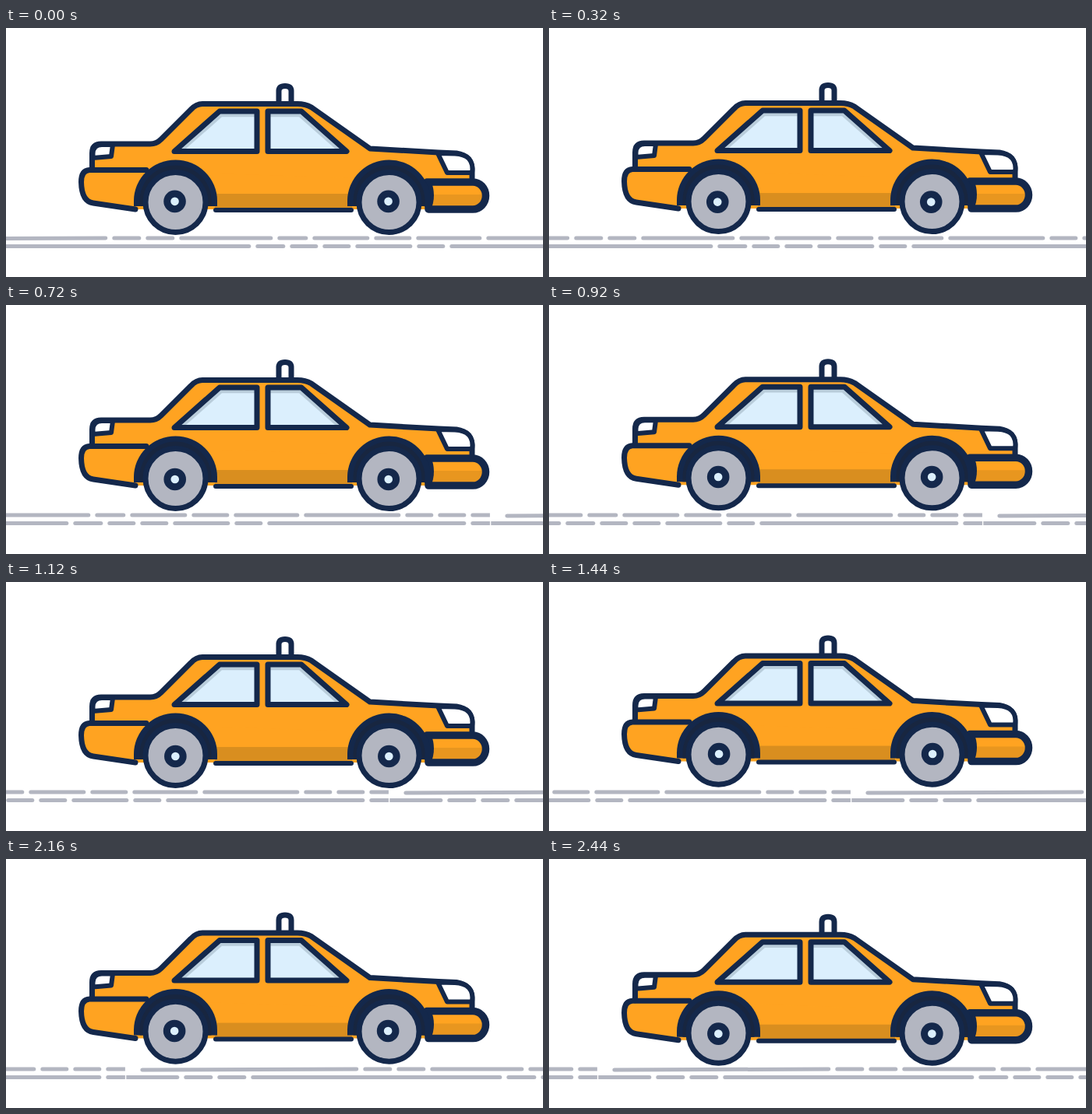
Recreate the animation shown at these times as an HTML page. Size 689x320 px, loop 2480 ms.

```html
<!DOCTYPE html>
<html lang="en">
<head>
<meta charset="utf-8">
<title>Taxi on the road</title>
<style>
html, body { margin: 0; width: 100%; height: 100%; overflow: hidden; background: #fff; }
svg { display: block; width: 689px; height: 320px; }
.line { fill: none; stroke: #14284b; stroke-width: 7; stroke-linecap: round; stroke-linejoin: round; }
.thin { stroke-width: 6; }
.thick { stroke-width: 9.5; }
.navy { fill: #14284b; }
.body { fill: #ffa321; }
.white { fill: #fff; }
.glass { fill: #dbeffd; }
.grey { fill: #b3b6c1; }
.road { stroke: #b3b6c1; stroke-width: 5; stroke-linecap: round; }
</style>
</head>
<body>
<svg viewBox="0 0 689 320">
  <defs>
    <clipPath id="tileClip"><rect y="260" width="1022.6" height="30"/></clipPath>
    <g id="tile" class="road" clip-path="url(#tileClip)"></g>
    <g id="arch">
      <path class="navy" d="M-53.5 229V222A53.5 52.5 0 0 1 53.5 222V229Z"/>
      <path fill="#182640" d="M-46 229V222A46 45.5 0 0 1 46 222V229Z"/>
    </g>
    <path id="shell" d="M110.5 182V161Q110.5 149 122 149H185Q193 149 199 143L237 105Q244 97.5 252 97.5H374Q384 97.5 392 102L467 155L555 160L578 161Q598 164 598 183V198"/>
    <path id="panes" d="M216 158.5L274 107H322V158.5ZM336 107H379L437 158.5H336Z"/>
  </defs>

  <g id="road"><use href="#tile"/><use href="#tile" x="1024"/></g>

  <g id="car">
    <path class="line white" d="M350 97V81Q350 74.5 358 74.5T366 81V97"/>
    <path class="body" d="M106 182H598V233H166L111 225Q97 223 97 197Q97 183 106 182Z"/>
    <use href="#shell" class="body"/>
    <rect x="268" y="213" width="176" height="19" fill="#d98e1f"/>
    <use href="#shell" class="line"/>
    <path class="line" d="M180 182.5H107Q96.5 183 96.5 198Q97 223 112 225L166 233"/>
    <path class="line thin white" d="M111.5 167L135 165L137 150H123Q112 150 111.5 161Z"/>
    <path class="line thin white" d="M554 161L566 186H598Q600 175 594 168Q588 162 576 161.5Z"/>

    <path class="body" d="M540 198H599A16.5 17.5 0 0 1 599 233H541Z"/>
    <path fill="#e8961f" d="M544 214H615.5Q615 233 599 233H541Z"/>
    <path class="navy" d="M530 196H545Q553 215 545 234H538Z"/>
    <path class="line thick" d="M540 198H599A16.5 17.5 0 0 1 599 233H542"/>

    <use href="#panes" fill="#b9cddb"/>
    <path class="glass" d="M227 158.5L277 114.3H322V158.5ZM336 114.3H376L426 158.5H336Z"/>
    <use href="#panes" class="line"/>

    <use href="#arch" x="217.5"/>
    <use href="#arch" x="491.5"/>
    <path class="line thin" d="M269 234H443"/>
  </g>

  <g id="wheels"></g>
</svg>
<script>
const LOOP = 2480, STEP = 40, TURN = 2 * Math.PI;
const get = id => document.getElementById(id);

function add(parent, tag, attrs) {
  const el = document.createElementNS('http://www.w3.org/2000/svg', tag);
  for (const k in attrs) el.setAttribute(k, attrs[k]);
  parent.append(el);
  return el;
}

// Lays dashes end to end; each pitch is a dash plus the gap after it
function dashes(x, y, tilt, pitches) {
  for (const pitch of pitches) {
    const y1 = pitch > 270 ? y + tilt : y;
    add(get('tile'), 'line', { x1: x + 2.5, y1, x2: x + pitch - 8.5, y2: y });
    x += pitch;
  }
}
dashes(18, 270, 1, [286, 43, 43, 126, 45, 79, 54, 90, 130, 42, 42, 42]);
dashes(-5, 280.6, 0, [79, 43, 43, 328, 44, 42, 42, 79, 42, 261, 42]);

const wheels = [217.5, 491.5].map(x => {
  const g = add(get('wheels'), 'g');
  add(g, 'circle', { r: 38.5, class: 'line grey' });
  const hub = add(g, 'g');
  add(hub, 'circle', { r: 14.3, class: 'navy' });
  add(hub, 'circle', { r: 5.3, class: 'glass' });
  return { x, g, hub };
});

const move = (el, x, y) => el.setAttribute('transform', `translate(${x.toFixed(2)} ${y.toFixed(2)})`);

function draw(t) {
  const lift = 1 - Math.cos(t / 400 * TURN);
  const spin = (t / 440 - 1 / 3) * TURN;
  move(get('road'), -167.7 - t * 0.325, 0);
  move(get('car'), 0, -1.35 * lift);
  for (const { x, g, hub } of wheels) {
    move(g, x, 224 - 1.3 * lift);
    move(hub, -0.4 + 1.1 * Math.cos(spin), 1.1 * Math.sin(spin) - 0.2);
  }
}

const start = performance.now();
function tick() {
  const t = (performance.now() - start) % LOOP;
  draw(Math.floor(t / STEP) * STEP);
  requestAnimationFrame(tick);
}
tick();
</script>
</body>
</html>
```
